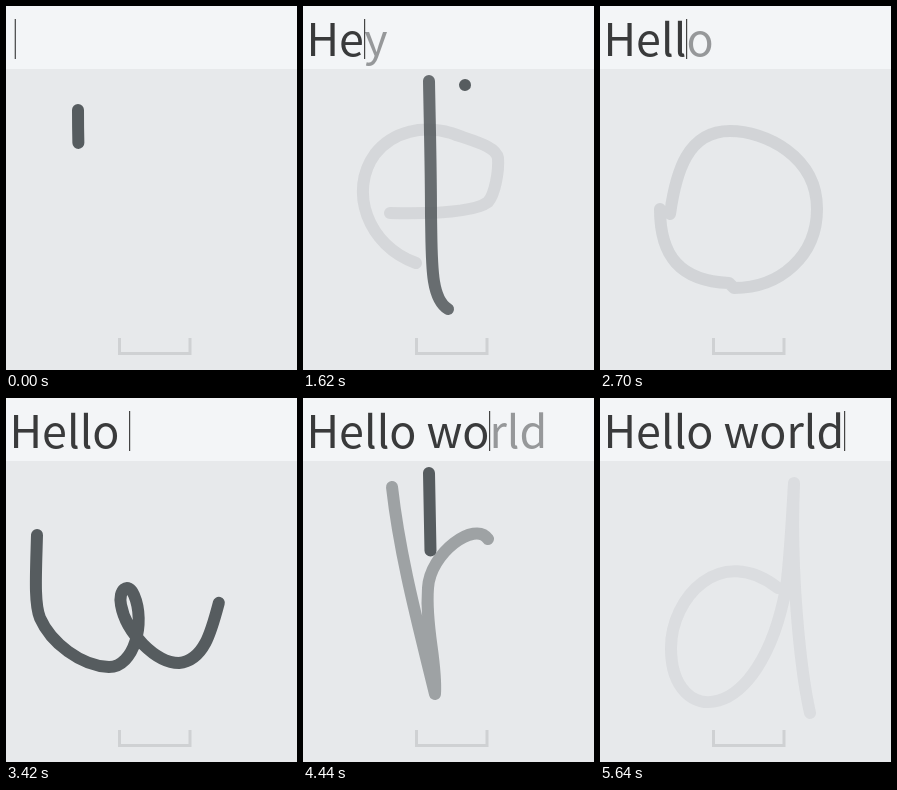
An HTML page that plays this animation: 291x364 px, repeating every 6240 ms.

```html
<!DOCTYPE html>
<html lang="en">
<head>
<meta charset="utf-8">
<style>
  html, body { margin: 0; width: 100%; height: 100%; overflow: hidden; background: #e7e9eb; }
  svg { display: block; width: 291px; height: 364px; }
  path { fill: none; }
  #ink { stroke: #565c5f; stroke-width: 12; stroke-linecap: round; stroke-linejoin: round; }
  text { font: 44.8px "Noto Sans CJK SC", "Noto Sans CJK JP", "Noto Sans", sans-serif; white-space: pre; }
</style>
</head>
<body>
<svg viewBox="0 0 291 364">
  <rect width="291" height="63" fill="#f3f5f7"/>
  <path d="M113.5 332V347.5H184V332" stroke="#cfd1d3" stroke-width="3"/>
  <text x="3.5" y="50" xml:space="preserve"><tspan id="typed" fill="#393a3b"></tspan><tspan id="guess" fill="#96989a"></tspan></text>
  <rect id="caret" y="13" width="1.2" height="40" fill="#444"/>
  <g id="ink"></g>
</svg>
<script>
const LOOP = 6240, STEP = 60, FADE = 480, COMMIT = 420, SPACE_AT = 2880;
const PHRASE = 'Hello world';
const SVG = 'http://www.w3.org/2000/svg';
const byId = id => document.getElementById(id);
const ink = byId('ink'), typed = byId('typed'), guess = byId('guess'), caret = byId('caret');
const clamp = (v, max) => Math.max(0, Math.min(max, v));

// Pen strokes of each letter, in writing order.
const firstL = ['M126 75C127 130 128 165 128 210C129 255 127 292 145 303'];
const secondL = ['M162 79C160 160 158 290 184 310'];
const H = [
  'M72 104C72 150 74 190 80 279',
  'M186 101V240C187 258 194 262 194 283',
  'M57 183C100 190 125 199 155 200L210 201'
];
const e = ['M87 207C130 208 172 206 185 196C192 188 196 165 195 152C193 140 170 135 148 127C120 119 90 125 72 148C45 185 65 240 113 257'];
const o = ['M70 208C76 165 88 125 130 125C165 125 217 150 217 203C217 250 180 282 134 282L129 277C80 275 60 250 60 203'];
const w = ['M31 137C30 175 28 205 34 220C45 245 75 268 103 269C128 269 140 225 128 197C122 183 112 192 115 207C120 235 150 265 173 265C205 262 208 215 220 180C225 162 232 150 241 136'];
const r = ['M89 89C97 160 116 230 132 296C134 262 122 230 125 190C127 155 172 122 185 141'];
const d = ['M178 190C120 145 71 200 71 250C71 330 160 330 186 190C190 160 192 120 194 85C190 170 200 270 210 315'];

const letters = [
  write(H, -45, 655), write(e, 600, 1200), write(firstL, 1260, 1560),
  write(secondL, 1620, 1920), write(o, 1920, 2290), write(w, 3060, 3480),
  write(o, 3540, 3900), write(r, 3960, 4200), write(firstL, 4320, 4680),
  write(d, 4740, 5200)
];

function write(strokes, start, end) {
  const node = ink.appendChild(document.createElementNS(SVG, 'g'));
  let total = 0;
  const lines = strokes.map(shape => {
    const path = node.appendChild(document.createElementNS(SVG, 'path'));
    path.setAttribute('d', shape);
    const length = path.getTotalLength(), from = total;
    total += length;
    return { path, from, length };
  });
  return { node, lines, start, end, total };
}

// The rest of the current word, offered once two letters are in.
function suggest(text) {
  const word = text.split(' ').pop();
  if (word.length < 2) return '';
  return word === 'He' ? 'y' : PHRASE.slice(text.length).split(' ')[0];
}

function draw(now) {
  const t = Math.floor(now % LOOP / STEP) * STEP;
  for (const { node, lines, start, end, total } of letters) {
    node.setAttribute('opacity', 1 - clamp((t - end) / FADE, 1));
    const inked = (t - start) / (end - start) * total;
    for (const { path, from, length } of lines) {
      path.style.display = inked < from ? 'none' : '';
      path.style.strokeDasharray = `${clamp(inked - from, length) + 0.01} ${length + 20}`;
    }
  }

  const count = letters.filter(l => t >= l.end + COMMIT).length + (t >= SPACE_AT);
  const text = PHRASE.slice(0, count), rest = suggest(text);
  if (typed.textContent !== text) typed.textContent = text;
  if (guess.textContent !== rest) guess.textContent = rest;
  caret.setAttribute('x', text ? Math.ceil(2.6 + typed.getComputedTextLength()) : 8.7);
}

const began = performance.now();
function tick() {
  draw(performance.now() - began);
  requestAnimationFrame(tick);
}
tick();
</script>
</body>
</html>
```
